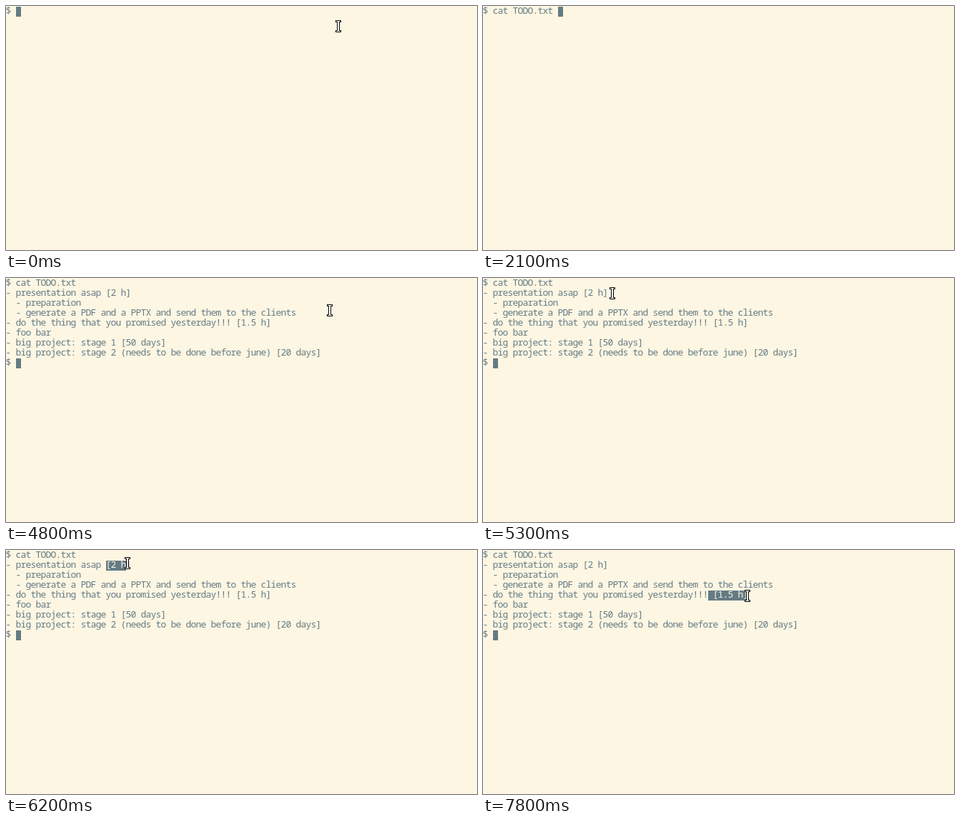
An HTML page that plays this animation: 659x343 px, repeating every 8000 ms.

```html
<!DOCTYPE html>
<html lang="en">
<head>
<meta charset="utf-8">
<title>Terminal</title>
<style>
  html, body { margin: 0; width: 100%; height: 100%; overflow: hidden; background: #fdf6e3; }
  svg { display: block; }
  text {
    font: 13px "Noto Sans Mono", "DejaVu Sans Mono", monospace;
    font-stretch: semi-condensed;
    text-anchor: middle;
    white-space: pre;
  }
  .ink { fill: #657b83; }
  .paper { fill: #fdf6e3; }
</style>
</head>
<body>
<svg width="659" height="343" viewBox="0 0 659 343">
  <defs><clipPath id="range"><rect id="selection" height="14"/></clipPath></defs>
  <g id="screen" class="ink"></g>
  <rect id="caret" class="ink" width="7" height="14"/>
  <g clip-path="url(#range)">
    <rect class="ink" width="659" height="343"/>
    <g id="selected" class="paper"></g>
  </g>
  <g id="pointer">
    <path d="M-4-8.5h8v3h-2v11h2v3h-8v-3h2v-11h-2z"/>
    <path fill="#fff" d="M-3-7.5h6v1h-2v13h2v1h-6v-1h2v-13h-2z"/>
  </g>
</svg>
<script>
const LOOP = 8000, TICK = 100;
const CELL = 7, ROW = 14, TOP = 1, BASELINE = 11;
const TYPE_AT = 800, PRINT_AT = 3400, RETURN_AT = 4800;
const $ = id => document.getElementById(id);

// One entry per tick; the last one is a tab completion
const keys = "c,,,a,,,t ,,,T,O,,,DO.txt ".split(",");
const lines = [
  "$ " + keys.join(""),
  "- presentation asap [2 h]",
  "  - preparation",
  "  - generate a PDF and a PPTX and send them to the clients",
  "- do the thing that you promised yesterday!!! [1.5 h]",
  "- foo bar",
  "- big project: stage 1 [50 days]",
  "- big project: stage 2 (needs to be done before june) [20 days]",
  "$ "
];

const linear = t => t;
const smooth = t => t * t * (3 - 2 * t);
const dip = t => t * (2.5 * t - 1.5);
const easeOut = power => t => 1 - (1 - t) ** power;

const rest = { x: 465, y: 28 };
const entry = { x: 453, y: 45 };
const firstPress = { x: 142, y: 20 };
const firstRelease = { x: 180, y: 31 };
const secondPress = { x: 319, y: 63 };
const secondRelease = { x: 370, y: 64 };

const moves = [
  { start: 4800, end: 5700, from: entry, to: firstPress, easeX: easeOut(2.57), easeY: easeOut(4) },
  { start: 5800, end: 6700, from: firstPress, to: firstRelease, easeX: easeOut(2.28), easeY: dip, drag: true },
  { start: 6700, end: 7000, from: firstRelease, to: secondPress, easeX: linear, easeY: linear },
  { start: 7100, end: 7800, from: secondPress, to: secondRelease, easeX: smooth, easeY: linear, drag: true }
];

function along({ start, end, from, to, easeX, easeY }, time) {
  const t = Math.min(1, (time - start) / (end - start));
  const mix = (a, b, amount) => Math.round(a + (b - a) * amount);
  return { x: mix(from.x, to.x, easeX(t)), y: mix(from.y, to.y, easeY(t)) };
}

function pointerAt(time) {
  const move = moves.findLast(({ start }) => start <= time);
  return move ? along(move, time) : rest;
}

function selectionAt(time) {
  const move = moves.findLast(({ start, drag }) => drag && start < time);
  if (!move) return { x: 0, y: 0, width: 0 };
  const row = Math.floor((move.from.y - TOP) / ROW);
  const first = Math.floor(move.from.x / CELL);
  const last = Math.min(Math.round(along(move, time).x / CELL), lines[row].length);
  return { x: first * CELL, y: TOP + row * ROW, width: Math.max(0, last - first) * CELL };
}

function setAttributes(node, values) {
  for (const name in values) node.setAttribute(name, values[name]);
}

// Each character is centred in its own terminal cell
function addLines(group) {
  return lines.map((line, row) => {
    const text = document.createElementNS("http://www.w3.org/2000/svg", "text");
    const centres = Array.from(line, (_, column) => (column + 0.5) * CELL);
    setAttributes(text, { x: centres.join(" "), y: BASELINE + row * ROW });
    text.textContent = line;
    return group.appendChild(text);
  });
}

const screen = addLines($("screen"));
addLines($("selected"));

function draw(time) {
  const pressed = Math.max(0, (time - TYPE_AT) / TICK + 1);
  const typed = "$ " + keys.slice(0, pressed).join("");
  const printed = time >= PRINT_AT;
  screen[0].textContent = typed;
  screen.slice(1).forEach(line => line.setAttribute("visibility", printed ? "visible" : "hidden"));
  setAttributes($("caret"), {
    x: CELL * (printed ? lines.at(-1) : typed).length,
    y: TOP + ROW * (printed ? lines.length - 1 : 0)
  });

  const { x, y } = pointerAt(time);
  setAttributes($("pointer"), {
    visibility: time < TYPE_AT || time >= RETURN_AT ? "visible" : "hidden",
    transform: `translate(${x} ${y + 0.5})`
  });
  setAttributes($("selection"), selectionAt(time));
}

function tick() {
  const time = performance.now() % LOOP;
  draw(Math.floor(time / TICK) * TICK);
  requestAnimationFrame(tick);
}
tick();
</script>
</body>
</html>
```
